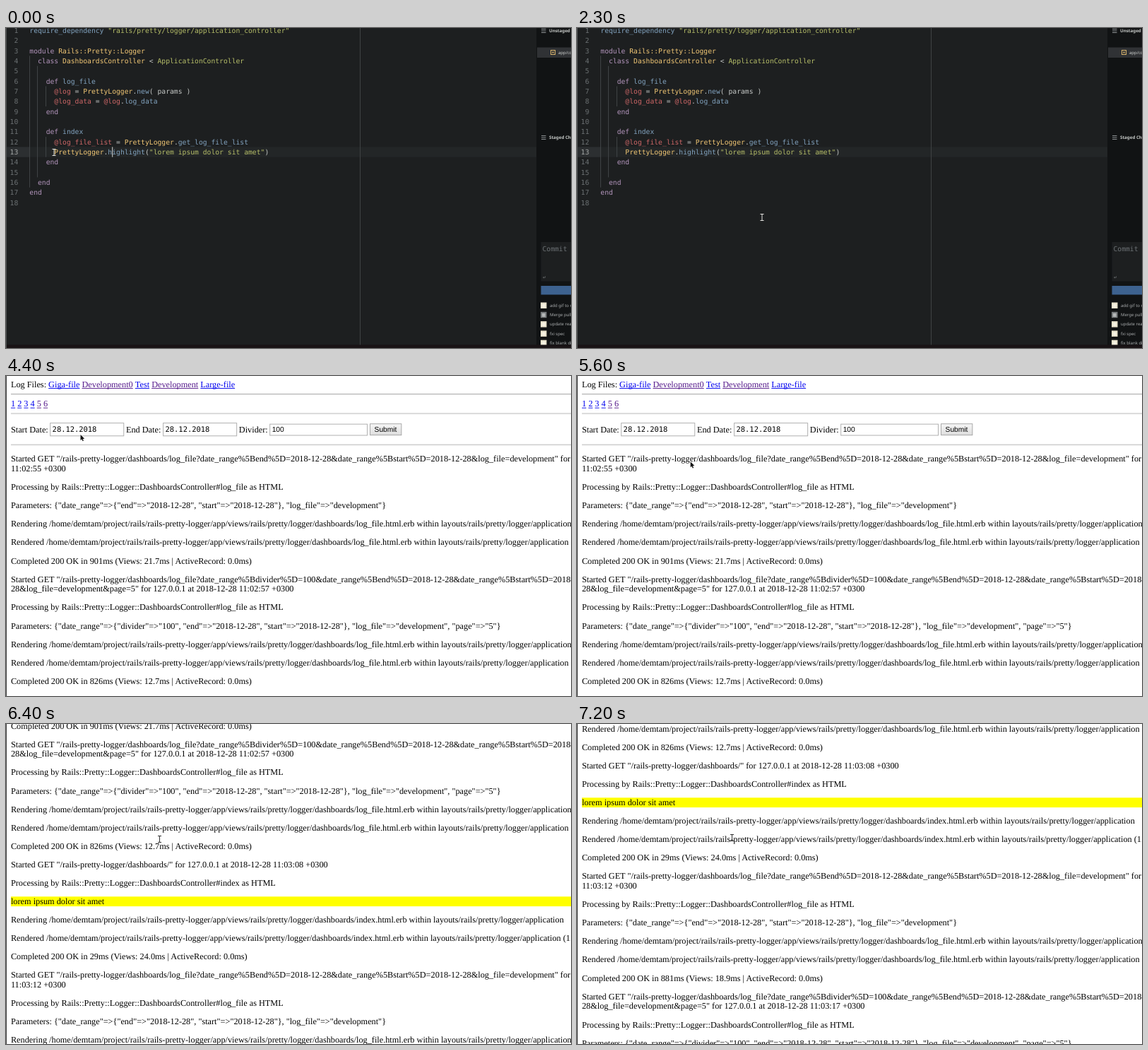
An HTML page with a canvas for the animation above (9000 ms loop, 800x453 px).

```html
<!DOCTYPE html>
<html lang="en">
<head>
<meta charset="utf-8">
<title>Pretty logger demo</title>
<style>
html, body { margin: 0; width: 100%; height: 100%; overflow: hidden; background: #1d1f20; }
canvas { display: block; }
</style>
</head>
<body>
<canvas width="800" height="453"></canvas>
<script>
const W = 800, H = 453, LOOP = 9000, STEP = 100;
const ctx = document.querySelector('canvas').getContext('2d');
const SERIF = '16px "Liberation Serif", serif';
const MONO = '9.71px "DejaVu Sans Mono", monospace';

function rect(x, y, w, h, color) {
  ctx.fillStyle = color;
  ctx.fillRect(x, y, w, h);
}

function text(str, x, y, color, font) {
  ctx.font = font;
  ctx.fillStyle = color;
  ctx.fillText(str, x, y);
  return ctx.measureText(str).width;
}

function path(points, t) {
  let i = points.findIndex(p => p[0] > t);
  if (i < 0) return points[points.length - 1].slice(1);
  if (i === 0) return points[0].slice(1);
  const [a, b] = [points[i - 1], points[i]];
  const k = (t - a[0]) / (b[0] - a[0]);
  return [a[1] + (b[1] - a[1]) * k, a[2] + (b[2] - a[2]) * k];
}

function iBeam(x, y, color) {
  rect(x - 0.5, y - 4.5, 1, 9, color);
  rect(x - 2.5, y - 5, 5, 1, color);
  rect(x - 2.5, y + 4, 5, 1, color);
}

function arrow(x, y) {
  ctx.beginPath();
  [[0, 0], [0, 8], [1.8, 6.4], [3.1, 9.2], [4.4, 8.6], [3.2, 5.9], [5.6, 5.7]]
    .forEach(([dx, dy]) => ctx.lineTo(x + dx, y + dy));
  ctx.closePath();
  ctx.strokeStyle = '#fff';
  ctx.lineWidth = 1;
  ctx.stroke();
  ctx.fillStyle = '#111';
  ctx.fill();
}

// ---- Editor ----
const CODE = `require_dependency "rails/pretty/logger/application_controller"

module Rails::Pretty::Logger
  class DashboardsController < ApplicationController

    def log_file
      @log = PrettyLogger.new( params )
      @log_data = @log.log_data
    end

    def index
      @log_file_list = PrettyLogger.get_log_file_list
      PrettyLogger.highlight("lorem ipsum dolor sit amet")
    end

  end
end
`.split('\n');
const TOKEN = /("[^"]*"|(?<=< )\w+)|(@\w+)|\b(module|class|def|end)\b|((?<=def |\.)\w+|require_dependency)|([A-Z][\w:]*)|([^\s\w"@]+|\w+)/g;
const COLORS = ['#b5bd68', '#cc6666', '#b294bb', '#81a2be', '#f0c674', '#c5c8c6'];
const CHAR = 5.845, LINE = 14.33, ACTIVE = 13;
const colX = col => 33.3 + col * CHAR;
const lineY = n => 3.6 + (n - 1) * LINE;

const EDITOR_MOUSE = [
  [100, 68, 176], [200, 69, 176], [500, 215, 178], [800, 375, 181],
  [1300, 375, 181], [1700, 262, 268]
];

function sidePanel() {
  const ui = '6px "Noto Sans", sans-serif', bold = 'bold 6.2px "Noto Sans", sans-serif';
  rect(751, 0, 49, H, '#111314');
  for (const y of [4, 155]) {
    for (let i = -1; i < 2; i++) rect(758, y + i * 2.5 - 0.5, 6.5, 1, '#8c9092');
  }
  text('Unstaged Changes', 769, 6.3, '#c5c8c6', bold);
  text('Staged Changes', 769, 157.3, '#c5c8c6', bold);
  rect(752, 27.5, 48, 14.5, '#303235');
  ctx.strokeStyle = '#d9b46c';
  ctx.lineWidth = 1;
  ctx.strokeRect(771.5, 31.5, 6, 6);
  rect(773.5, 33.5, 2, 2, '#d9b46c');
  text('app/controllers', 782, 37, '#d0d2d0', ui);
  rect(757.5, 303, 43, 55.5, '#1d1f20');
  text('Commit message', 759.5, 316.3, '#6d7275', MONO);
  text('↵', 760, 355, '#7b7f81', '6px "DejaVu Sans", sans-serif');
  rect(757.5, 365, 43, 12.5, '#3d628f');
  ['add gif to readme', 'Merge pull request', 'update readme', 'fxi spec', 'fix blank div'].forEach((s, i) => {
    const y = 392.5 + i * 13.3, merge = i === 1;
    rect(757, y - 4, 8.5, 8.5, merge ? '#777b7c' : '#e8e2cc');
    rect(759, y - 2, 4.5, 5, merge ? '#b5b8b8' : '#f7f3e4');
    text(s, 770, y + 2.2, '#a9acad', ui);
  });
}

function editor(t) {
  const selecting = t >= 200 && t < 1900;
  const [mx, my] = path(EDITOR_MOUSE, t);
  const caretCol = t < 100 ? 20 : t < 800 ? Math.min(58, Math.round((mx - 33.3) / CHAR)) : 58;
  const rowTop = lineY(ACTIVE) - LINE / 2;

  rect(0, 0, W, H, '#1d1f20');
  if (!selecting) rect(33, rowTop, 718, LINE, '#232627');
  rect(1, rowTop, 32, LINE, '#2c2f31');
  if (selecting) rect(colX(6), rowTop, colX(caretCol) - colX(6), LINE, '#373b41');

  const guide = (col, from, to) =>
    rect(Math.floor(colX(col)), lineY(from) - LINE / 2, 1, (to - from + 1) * LINE, '#3f4345');
  guide(0, 4, 16);
  guide(2, 5, 15);
  guide(4, 7, 8);
  guide(4, 12, 13);
  rect(501, 0, 1, H, '#3f4243');

  CODE.forEach((line, i) => {
    const n = i + 1, y = lineY(n) + 3.5;
    ctx.textAlign = 'right';
    text(n, 17.3, y, n === ACTIVE ? '#a5a8a7' : '#6b7072', MONO);
    ctx.textAlign = 'left';
    for (const m of line.matchAll(TOKEN)) {
      const kind = m.slice(1).findIndex(Boolean);
      text(m[0], colX(m.index), y, COLORS[kind], MONO);
    }
  });

  if (t < 1100 || (t >= 1900 && t < 2300)) rect(colX(caretCol), rowTop, 1, LINE, '#d5d8d6');
  sidePanel();
  rect(0, 448.5, W, 4.5, '#191315');
  rect(0, 0, 1, H, '#4a4d4e');
  iBeam(mx, my, '#e4e4e0');
}

// ---- Log page, laid out in unscaled page pixels ----
const SCALE = 0.767, BLUE = '#0000ee', VISITED = '#551a8b';
const VIEWS = '/home/demtam/project/rails/rails-pretty-logger/app/views/rails/pretty/logger/dashboards/';
const RANGE = 'date_range%5Bend%5D=2018-12-28&date_range%5Bstart%5D=2018-12-';

const processing = action => `Processing by Rails::Pretty::Logger::DashboardsController#${action} as HTML`;
const rendering = (view, time) => ['Rendering ', 'Rendered '].map((verb, i) =>
  `${verb}${VIEWS}${view}.html.erb within layouts/rails/pretty/logger/application${i ? ` (${time}ms)` : ''}`);
const completed = (total, views) => `Completed 200 OK in ${total}ms (Views: ${views}ms | ActiveRecord: 0.0ms)`;
const showLog = (clock, total, views) => [
  `Started GET "/rails-pretty-logger/dashboards/log_file?${RANGE}28&log_file=development" for 127.0.0.1 at 2018-12-28\n${clock} +0300`,
  processing('log_file'),
  'Parameters: {"date_range"=>{"end"=>"2018-12-28", "start"=>"2018-12-28"}, "log_file"=>"development"}',
  ...rendering('log_file', '18.2'),
  completed(total, views)
];
const showPage = (clock, total, views) => [
  `Started GET "/rails-pretty-logger/dashboards/log_file?date_range%5Bdivider%5D=100&${RANGE}\n28&log_file=development&page=5" for 127.0.0.1 at 2018-12-28 ${clock} +0300`,
  processing('log_file'),
  'Parameters: {"date_range"=>{"divider"=>"100", "end"=>"2018-12-28", "start"=>"2018-12-28"}, "log_file"=>"development", "page"=>"5"}',
  ...rendering('log_file', '10.4'),
  completed(total, views)
];
const HIGHLIGHT = 'lorem ipsum dolor sit amet';
const LOG = [
  ...showLog('11:02:55', 901, '21.7'),
  ...showPage('11:02:57', 826, '12.7'),
  'Started GET "/rails-pretty-logger/dashboards/" for 127.0.0.1 at 2018-12-28 11:03:08 +0300',
  processing('index'),
  HIGHLIGHT,
  ...rendering('index', '1.1'),
  completed(29, '24.0'),
  ...showLog('11:03:12', 881, '18.9'),
  ...showPage('11:03:17', 826, '12.7')
];

const PAGE_MOUSE = [
  [3100, 8, 34], [3500, 60, 34], [3900, 246, 10], [4000, 246, 10],
  [4400, 105.5, 83], [4600, 78, 95], [4800, 36, 82], [5000, 45, 35],
  [5100, 50, 38], [5400, 50, 38], [5700, 216, 163], [6000, 216.5, 163],
  [6400, 217.5, 163], [7100, 219, 161], [7200, 219.5, 161]
];

function scrollAt(t) {
  if (t <= 5800) return 0;
  if (t <= 6000) return 53 * (t - 5800) / 200;
  if (t <= 6400) return 53 + 206 * (t - 6000) / 400;
  const left = 1 - Math.min(1, (t - 6400) / 500);
  return 259 + 140 * (1 - left * left);
}

function links(x, baseline, items) {
  for (const [label, color] of items) {
    const w = text(label, x, baseline, color, SERIF);
    rect(x, baseline + 1.6, w, 1.2, color);
    x += w + 4;
  }
}

function rule(y) {
  rect(8, y, 1100, 1.1, '#9a9a9a');
  rect(8, y + 1.1, 1100, 0.9, '#e8e8e8');
}

function field(x, y, w, h, value, font) {
  rect(x, y, w, h, '#b0b0b0');
  rect(x + 1.3, y + 1.3, w - 2.6, h - 2.6, '#fff');
  text(value, x + 4.5, 104.3, '#000', font);
}

function form() {
  const date = '13.6px "DejaVu Sans Mono", monospace', sans = '13.33px "Liberation Sans", sans-serif';
  text('Start Date:', 8, 105, '#000', SERIF);
  field(80, 87.5, 137, 25, '28.12.2018', date);
  text('End Date:', 220.5, 105, '#000', SERIF);
  field(288.5, 87.5, 137, 25, '28.12.2018', date);
  text('Divider:', 429, 105, '#000', SERIF);
  field(485.5, 89.5, 181, 22, '100', sans);
  const shade = ctx.createLinearGradient(0, 89, 0, 111);
  shade.addColorStop(0, '#f6f6f6');
  shade.addColorStop(1, '#dddddd');
  rect(670.5, 89, 59, 22, '#a3a3a3');
  rect(671.7, 90.2, 56.6, 19.6, shade);
  text('Submit', 679, 104.5, '#000', sans);
}

function logPage(t) {
  rect(0, 0, W, H, '#fff');
  const tint = Math.max(0, 0.23 * (1 - (t - 2700) / 200));
  if (tint) {
    ctx.fillStyle = `rgba(0,0,0,${tint})`;
    ctx.beginPath();
    ctx.roundRect(4, 27, 67, 16, 3);
    ctx.fill();
  }

  ctx.save();
  ctx.translate(0.8, -1 - scrollAt(t));
  ctx.scale(SCALE, SCALE);
  const w = text('Log Files: ', 8, 22, '#000', SERIF);
  links(8 + w, 22, [['Giga-file', BLUE], ['Development0', VISITED], ['Test', BLUE], ['Development', VISITED], ['Large-file', BLUE]]);
  rule(34);
  links(8, 58, [1, 2, 3, 4, 5, 6].map(n => [n, n < 5 ? BLUE : VISITED]));
  rule(70);
  form();
  rule(127.5);

  let y = 145.5;
  for (const entry of LOG) {
    if (entry === HIGHLIGHT) rect(8, y, 1100, 18, '#ffff00');
    for (const line of entry.split('\n')) {
      text(line, 8, y + 14, '#000', SERIF);
      y += 18;
    }
    y += 16;
  }
  ctx.restore();

  rect(0, 0, 1, H, '#444');
  if (t >= 3100) {
    const [x, my] = path(PAGE_MOUSE, t);
    if (t < 5700) arrow(x, my);
    else iBeam(x, my, '#333');
  }
}

function draw(now) {
  const t = Math.floor(now % LOOP / STEP) * STEP;
  ctx.textRendering = 'geometricPrecision';
  if (t < 2700) editor(t);
  else logPage(t);
  requestAnimationFrame(draw);
}

const start = performance.now();
requestAnimationFrame(function first() { draw(0); });
const clockedDraw = draw;
draw = () => clockedDraw(performance.now() - start);
</script>
</body>
</html>
```
